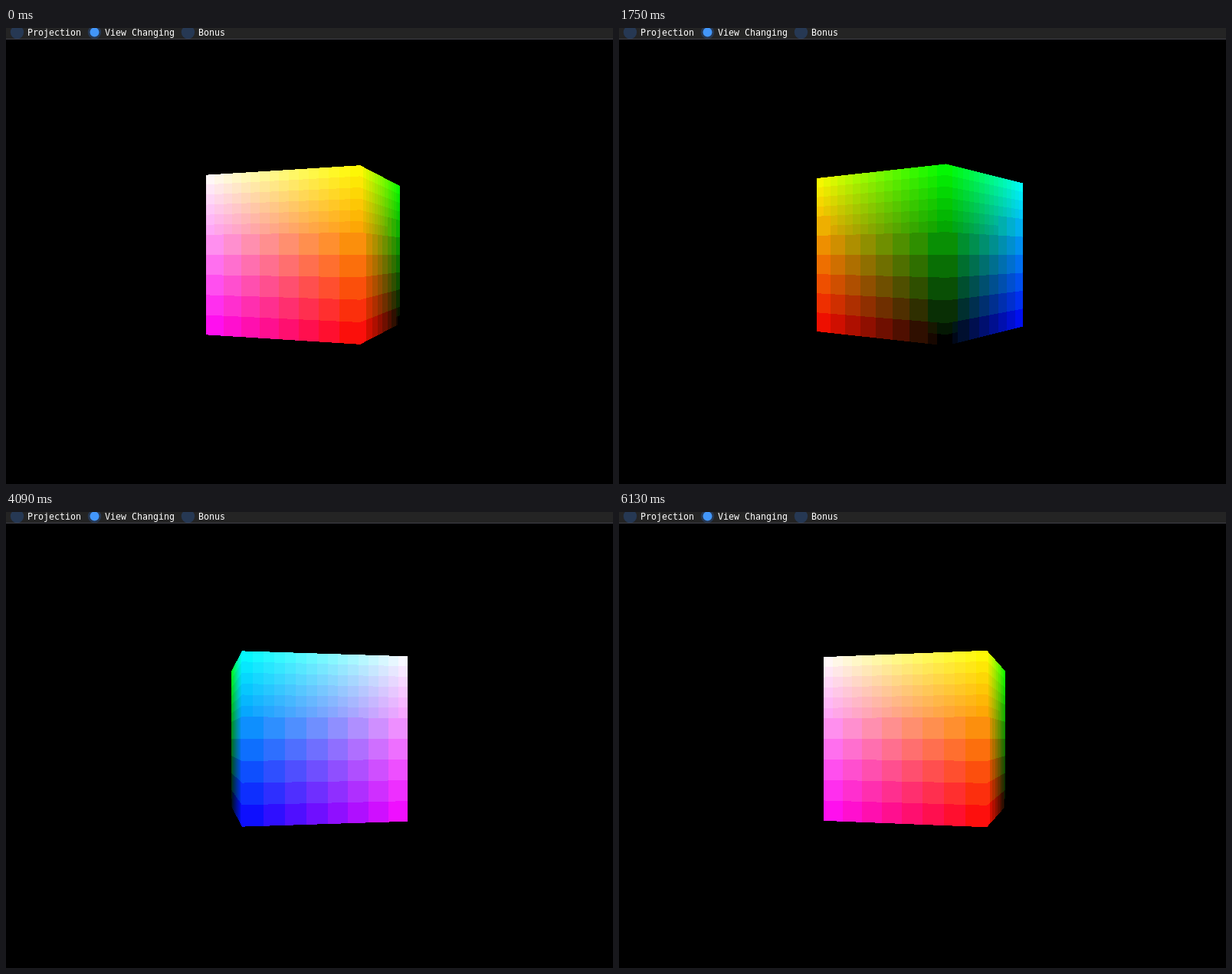
An HTML page with a canvas for the animation above (6180 ms loop, 792 px wide and 595 px high).

```html
<!DOCTYPE html>
<html lang="en">
<head>
<meta charset="utf-8">
<title>View Changing</title>
<style>
  html, body { margin: 0; width: 100%; height: 100%; overflow: hidden; background: #000; }
  canvas { display: block; }
</style>
</head>
<body>
<canvas id="stage" width="792" height="595"></canvas>
<script>
const ctx = document.getElementById('stage').getContext('2d');
const LOOP = 6180;

// Camera: 45 degree lens on a 600 px view, unit half-size cube
const CX = 397, CY = 296, DIST = 7.5;
const FOCAL = 300 / Math.tan(Math.PI / 8);
const BOX = { x: 256, y: 175, w: 282, h: 242 };
const MAX_COLOURS = 255;

// Runs of evenly spaced picture changes: first time, last time, count
const RUNS = [
  [0, 0, 1], [70, 660, 9], [740, 1130, 6], [1200, 1350, 3], [1430, 1750, 5],
  [1840, 2000, 3], [2080, 2690, 9], [2770, 2840, 2], [2920, 3320, 6],
  [3390, 3930, 8], [4010, 4090, 2], [4160, 4620, 7], [4700, 4940, 4],
  [5020, 5250, 4], [5320, 5870, 8], [5950, 6130, 3]
];
const TIMES = RUNS.flatMap(([a, b, n]) =>
  Array.from({ length: n }, (_, i) => n > 1 ? Math.round((a + (b - a) * i / (n - 1)) / 10) * 10 : a));

// Orbit, close to one radian per second: time, angle of the red edge
const ORBIT = [
  [0, 23.2], [660, -16.9], [1130, -43.5], [1750, -79.7], [2840, -141.8],
  [4090, -213.3], [4940, -263.2], [5870, -316.5], [6130, -329.4]
];

function angleAt(t) {
  let i = 1;
  while (i < ORBIT.length - 1 && t > ORBIT[i][0]) i++;
  const [t0, a0] = ORBIT[i - 1], [t1, a1] = ORBIT[i];
  return a0 + (a1 - a0) * (t - t0) / (t1 - t0);
}

// Vertical edges in order, with their red and blue amounts
const EDGES = [[-90, 1, 1], [0, 1, 0], [90, 0, 0], [180, 0, 1]];

function corners(deg) {
  return EDGES.map(([off, r, b]) => {
    const a = (deg + off) * Math.PI / 180;
    return { x: Math.SQRT2 * Math.sin(a), z: DIST - Math.SQRT2 * Math.cos(a), r, b };
  });
}

// Nearest wall seen through one pixel column
function castColumn(px, pts) {
  const k = (px + 0.5 - CX) / FOCAL;
  let hit = null;
  pts.forEach((p, i) => {
    const q = pts[(i + 1) % 4];
    const s = (k * p.z - p.x) / (q.x - p.x - k * (q.z - p.z));
    if (!(s >= 0 && s <= 1)) return;
    const z = p.z + s * (q.z - p.z);
    if (hit && hit.z <= z) return;
    hit = {
      z, half: FOCAL / z,
      r: Math.round(255 * (p.r + s * (q.r - p.r))),
      b: Math.round(255 * (p.b + s * (q.b - p.b)))
    };
  });
  return hit;
}

const nodeOf = c => (c >> 9 & 7) << 6 | (c >> 5 & 7) << 3 | (c >> 1 & 7);
const image = ctx.createImageData(BOX.w, BOX.h);

function drawCube(deg) {
  const pts = corners(deg);
  const cols = Array.from({ length: BOX.w }, (_, i) => castColumn(BOX.x + i, pts));
  const cells = new Int16Array(BOX.w * BOX.h).fill(-1);
  const greens = new Uint8Array(BOX.w * BOX.h);
  const seen = new Uint8Array(4096), kids = new Uint8Array(512), merged = new Uint8Array(512);
  const order = [];
  let total = 0;

  const note = cell => {
    if (seen[cell]) return;
    seen[cell] = 1;
    total++;
    const node = nodeOf(cell);
    if (!kids[node]++) order.push(node);
  };

  note(0);
  for (let y = 0, p = 0; y < BOX.h; y++) {
    for (let x = 0; x < BOX.w; x++, p++) {
      const c = cols[x];
      if (!c) continue;
      const up = CY - (BOX.y + y + 0.5);
      if (Math.abs(up) > c.half) continue;
      const g = Math.round(255 * (c.half + up) / (2 * c.half));
      greens[p] = g;
      cells[p] = (c.r >> 4) << 8 | (g >> 4) << 4 | c.b >> 4;
      note(cells[p]);
    }
  }

  // Octree reduction: the latest colour groups collapse first
  for (let i = order.length - 1; i >= 0 && total > MAX_COLOURS; i--) {
    merged[order[i]] = 1;
    total -= kids[order[i]] - 1;
  }

  const leafOf = cell => merged[nodeOf(cell)] ? 4096 + nodeOf(cell) : cell;
  const sums = new Float64Array(4608 * 4);
  sums[3] = 1e5;
  for (let p = 0; p < cells.length; p++) {
    if (cells[p] < 0) continue;
    const o = leafOf(cells[p]) * 4, c = cols[p % BOX.w];
    sums[o] += c.r;
    sums[o + 1] += greens[p];
    sums[o + 2] += c.b;
    sums[o + 3]++;
  }
  for (let p = 0; p < cells.length; p++) {
    const o = cells[p] < 0 ? 0 : leafOf(cells[p]) * 4;
    for (let k = 0; k < 3; k++) image.data[p * 4 + k] = Math.floor(sums[o + k] / sums[o + 3]);
    image.data[p * 4 + 3] = 255;
  }
  ctx.putImageData(image, BOX.x, BOX.y);
}

function disc(x, r, fill) {
  ctx.fillStyle = fill;
  ctx.beginPath();
  ctx.arc(x, 5.5, r, 0, 2 * Math.PI);
  ctx.fill();
}

function drawBar() {
  ctx.fillStyle = '#000';
  ctx.fillRect(0, 0, 792, 595);
  ctx.fillStyle = '#242424';
  ctx.fillRect(0, 0, 792, 14);
  ctx.font = '11.63px "DejaVu Sans Mono", monospace';
  [['Projection', 28], ['View Changing', 129], ['Bonus', 251]].forEach(([label, x], i) => {
    disc(x - 13.5, 8.7, '#263853');
    if (i === 1) disc(x - 13.5, 6, '#4296fa');
    ctx.fillStyle = '#fff';
    ctx.fillText(label, x, 10);
  });
  ctx.fillStyle = '#000';
  ctx.fillRect(0, 14, 792, 2);
  ctx.fillStyle = '#404049';
  ctx.fillRect(0, 14, 792, 1);
}

const start = performance.now();
let shown = -1;

function tick(now) {
  const t = Math.max(0, now - start) % LOOP;
  let i = TIMES.length - 1;
  while (i > 0 && TIMES[i] > t) i--;
  if (i !== shown) {
    shown = i;
    drawCube(angleAt(TIMES[i]));
  }
  requestAnimationFrame(tick);
}

drawBar();
tick(start);
</script>
</body>
</html>
```
